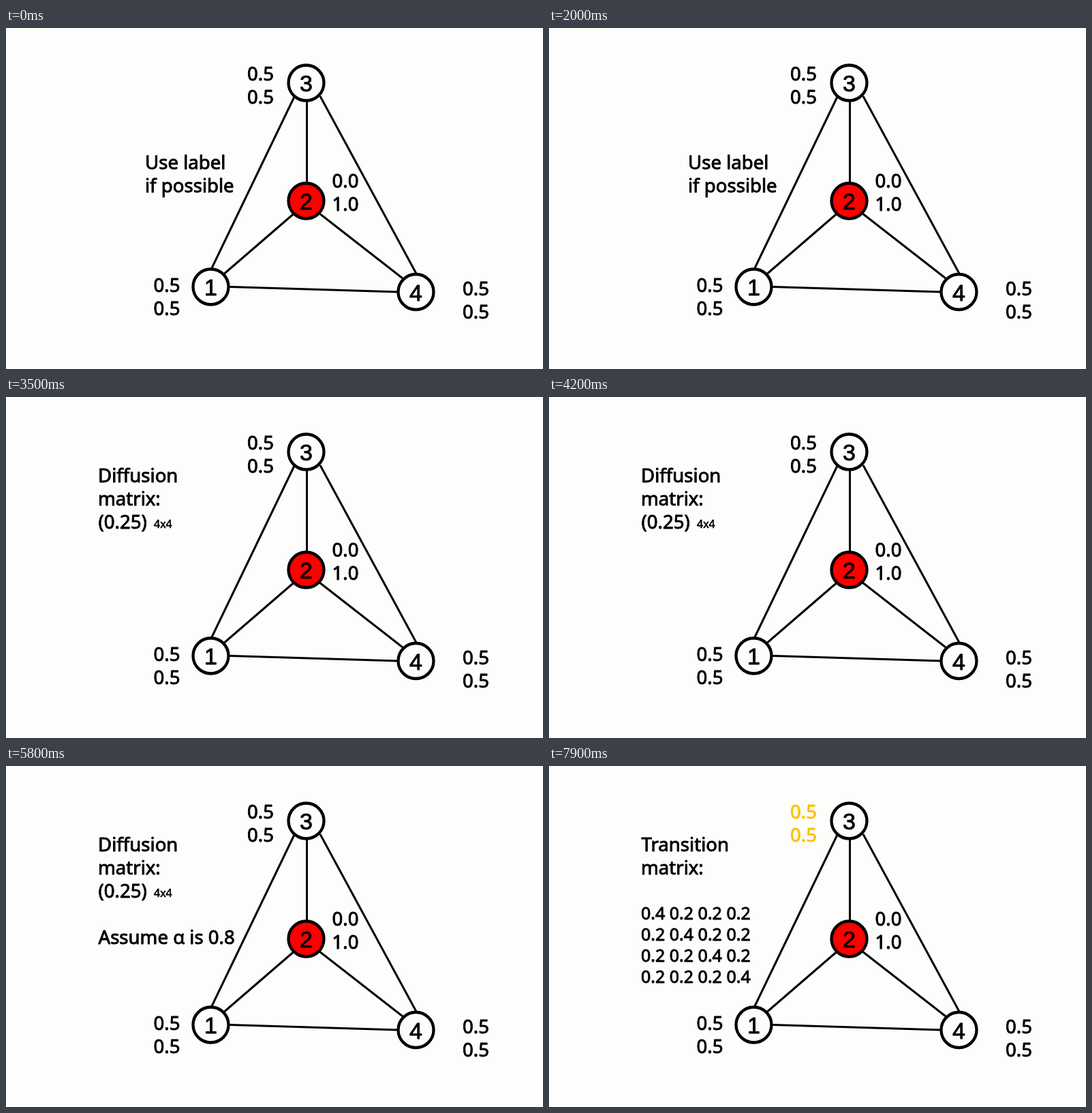
An HTML page with a canvas for the animation above (8000 ms loop, 788 by 500 pixels).

```html
<!DOCTYPE html>
<html lang="en">
<head>
<meta charset="utf-8">
<title>Label spreading on a graph</title>
<style>
html, body { margin: 0; width: 100%; height: 100%; overflow: hidden; background: #fdfdfb; }
canvas { display: block; }
</style>
</head>
<body>
<canvas id="stage" width="788" height="500"></canvas>
<script>
const ctx = document.getElementById('stage').getContext('2d');
const LOOP = 8000;
const PAPER = '#fdfdfb', INK = '#000', RED = '#ff0000', GOLD = '#ffc000';
const STEPS = { diffusion: 3200, alpha: 4700, transition: 6200 };
const TEXT = '"Noto Sans", "Open Sans", sans-serif';
const DIGIT = '"Liberation Sans", Arial, sans-serif';
const SIZE = 27.6;

const edges = [
  [423, 101, 302, 352], [461, 100, 602, 360], [441.5, 107, 441.5, 227],
  [421.5, 273, 320, 360.5], [460, 272, 582, 367], [328, 379.5, 575, 387]
];
const nodes = [
  ['1', 300.5, 379.5, PAPER], ['2', 440.5, 253.5, RED],
  ['3', 440.5, 80.5, PAPER], ['4', 601.5, 387, PAPER]
];

// A thin outline gives the letters a medium weight.
function text(str, x, y, size = SIZE, color = INK, family = TEXT, weight = 0.9) {
  ctx.font = `${size}px ${family}`;
  ctx.fillStyle = ctx.strokeStyle = color;
  ctx.lineWidth = weight;
  ctx.fillText(str, x, y);
  ctx.strokeText(str, x, y);
}

function pair(a, b, x, y, color) {
  text(a, x, y, SIZE, color);
  text(b, x, y + 34, SIZE, color);
}

function drawGraph() {
  ctx.strokeStyle = INK;
  ctx.lineWidth = 3;
  for (const [x1, y1, x2, y2] of edges) {
    ctx.beginPath();
    ctx.moveTo(x1, y1);
    ctx.lineTo(x2, y2);
    ctx.stroke();
  }
  for (const [name, x, y, fill] of nodes) {
    ctx.beginPath();
    ctx.arc(x, y, 26, 0, Math.PI * 2);
    ctx.fillStyle = fill;
    ctx.strokeStyle = INK;
    ctx.lineWidth = 4.3;
    ctx.fill();
    ctx.stroke();
    ctx.textAlign = 'center';
    text(name, x, y + 12.5, 34, INK, DIGIT);
    ctx.textAlign = 'left';
  }
}

function drawNotes(t) {
  if (t < STEPS.diffusion) {
    text('Use label', 204, 207);
    text('if possible', 204, 241);
  } else if (t < STEPS.transition) {
    text('Diffusion', 135, 124.5);
    text('matrix:', 135, 158.5);
    text('(0.25)', 135.5, 192.5);
    text('4x4', 217, 192, 16, INK, TEXT, 0.6);
    if (t >= STEPS.alpha) text('Assume α is 0.8', 135.5, 261);
  } else {
    text('Transition', 135.5, 124.5);
    text('matrix:', 135, 158.5);
    for (let r = 0; r < 4; r++) {
      const row = [0, 1, 2, 3].map(c => c === r ? '0.4' : '0.2').join(' ');
      text(row, 135, 224.5 + 31 * r, 25);
    }
  }
}

function draw(t) {
  ctx.fillStyle = PAPER;
  ctx.fillRect(0, 0, 788, 500);
  drawGraph();
  pair('0.5', '0.5', 354, 76.5, t >= STEPS.transition ? GOLD : INK);
  pair('0.0', '1.0', 478.5, 233.5);
  pair('0.5', '0.5', 216.5, 386.5);
  pair('0.5', '0.5', 670, 391.5);
  drawNotes(t);
}

const start = performance.now();
function frame() {
  draw((performance.now() - start) % LOOP);
  requestAnimationFrame(frame);
}
ctx.lineJoin = 'round';
frame();
</script>
</body>
</html>
```
